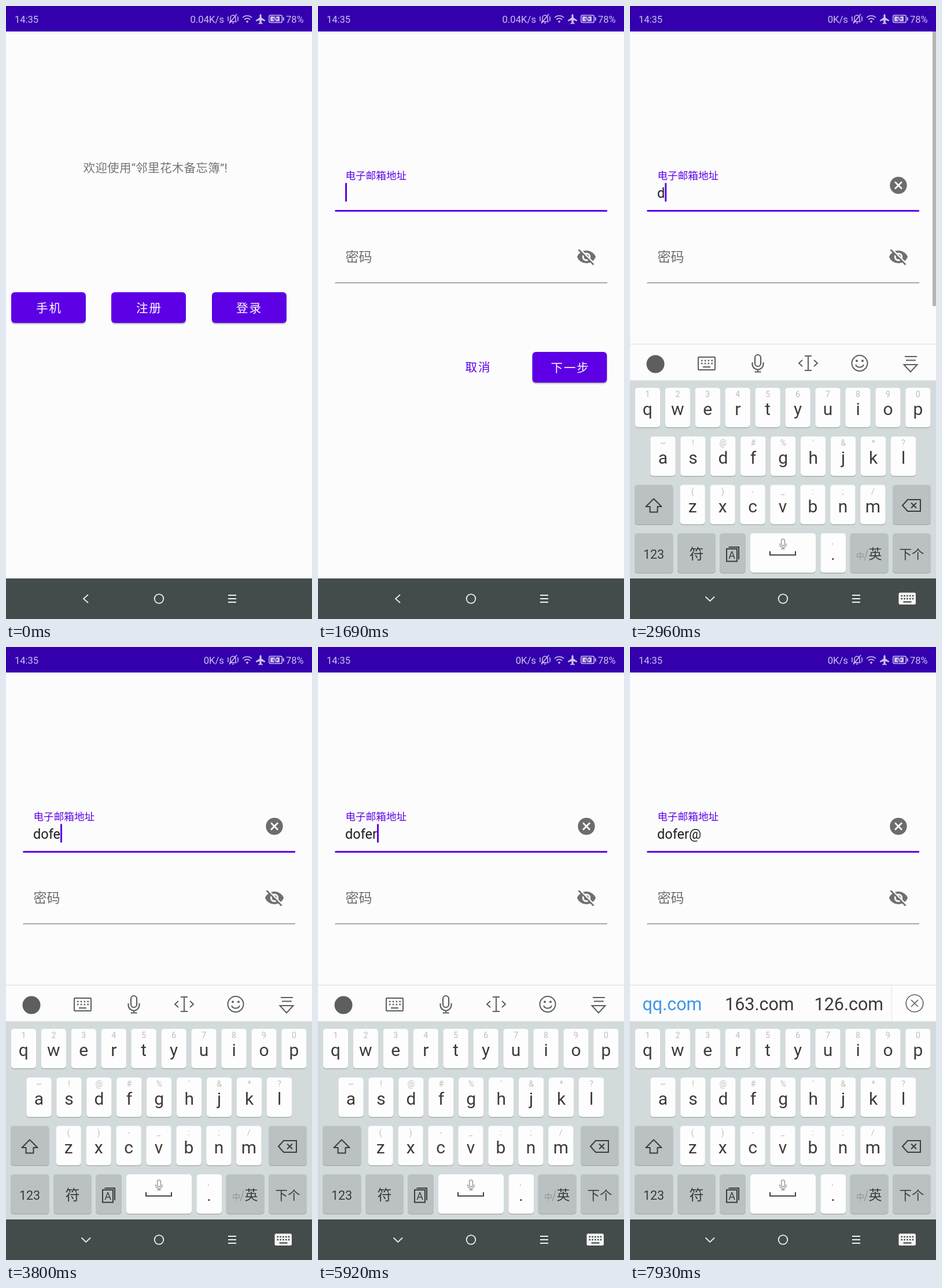
Recreate the animation shown at these times as an HTML page. Size 529 by 1058 pixels, loop 8000 ms.

```html
<!DOCTYPE html>
<html lang="zh-CN">
<head>
<meta charset="utf-8">
<style>
html, body { margin: 0; width: 100%; height: 100%; overflow: hidden; background: #fcfcfd; }
svg { display: block; width: 529px; height: 1058px; font-family: Roboto, "Noto Sans CJK SC", sans-serif; }
text { white-space: pre; }
</style>
</head>
<body>
<svg id="stage" viewBox="0 0 529 1058"></svg>
<script>
const PURPLE = '#5d00e6', INK = '#3b3b3b', ICON = '#5c5f5e', NAV = '#444b4b';
const LOOP = 8000, NAME = 'dofer@';
// time at which each character appears
const TYPED = [2850, 3170, 3490, 3700, 3910, 7180];
const FOCUS = 1480;

const rect = (x, y, w, h, fill, r = 0, more = '') =>
  `<rect x="${x}" y="${y}" width="${w}" height="${h}" rx="${r}" fill="${fill}" ${more}/>`;
const text = (x, y, size, fill, str, more = '') =>
  `<text x="${x}" y="${y}" font-size="${size}" fill="${fill}" ${more}>${str}</text>`;
const mid = (x, y, size, fill, str) => text(x, y, size, fill, str, 'text-anchor="middle"');
const line = (d, color, w = 2, more = '') =>
  `<path d="${d}" fill="none" stroke="${color}" stroke-width="${w}" ${more}/>`;
const disc = (x, y, r, fill, more = '') => `<circle cx="${x}" cy="${y}" r="${r}" fill="${fill}" ${more}/>`;
const ring = (x, y, r, color, w = 2) => disc(x, y, r, 'none', `stroke="${color}" stroke-width="${w}"`);
const group = (id, body, more = '') => `<g id="${id}" ${more}>${body}</g>`;

const button = (x, y, tx, label) =>
  rect(x, y + 3, 129, 53, '#000', 6, 'opacity=".1"') +
  rect(x, y + 1.5, 129, 53, '#000', 6, 'opacity=".18"') +
  rect(x, y, 129, 53, PURPLE, 6) +
  text(tx, y + 34.5, 20.57, '#fff', label, 'letter-spacing="1.84"');

function status() {
  const c = '#cdc3ec';
  return rect(0, 0, 529, 44, '#3400ae') +
    text(15, 29, 16.5, c, '14:35') +
    text(377, 29, 16.7, c, '', 'id="speed" text-anchor="end"') +
    // muted bell
    line('M386 27h13M388 26v-5a4.5 5 0 0 1 9 0v5M391 29.500h3M386 30L399 14M384 18v8M401 18v8', c, 1.5) +
    // wifi
    line('M409 20a11.500 11.500 0 0 1 16 0M412 23.500a7 7 0 0 1 10 0', c, 1.6) + disc(417, 27, 1.8, c) +
    // plane
    `<path fill="${c}" d="M440 14q1.600 0 1.600 3v3l6.400 4.500v2l-6.400-2v4l2 1.500v1.500l-3.600-1l-3.600 1v-1.500l2-1.500v-4l-6.400 2v-2l6.400-4.500v-3q0-3 1.600-3z"/>` +
    // charging battery
    rect(454.8, 16, 22.5, 12.5, 'none', 2.5, `stroke="${c}" stroke-width="1.5"`) +
    rect(457, 18, 16, 8.5, c) + rect(478.800, 19.500, 2, 5.500, c) +
    `<path d="M467 16.500l-6 6.500h4l-2 5l7-6.500h-4z" fill="${c}" stroke="#3400ae"/>` +
    text(484, 29, 16.5, c, '78%');
}

const welcome = () => rect(0, 44, 529, 944, '#fcfcfd') +
  text(133.5, 287, 20.57, '#757575', '欢迎使用“邻里花木备忘簿”!', 'letter-spacing=".25"') +
  button(9, 494, 52, '手机') + button(182, 494, 225, '注册') + button(356, 494, 398, '登录') +
  `<clipPath id="pad"><rect x="182" y="494" width="129" height="53" rx="6"/></clipPath>` +
  disc(246, 520, 0, '#fff', 'id="ripple" clip-path="url(#pad)"');

const eye = () => `<g transform="translate(464 433)">
  <path d="M-16.200 0A17.400 17.400 0 0 1 16.200 0A17.400 17.400 0 0 1-16.200 0" fill="#707070"/>` +
  ring(0, 0, 5.8, '#fcfcfd', 2.9) +
  line('M-12-14L14 12', '#fcfcfd', 2.8) + line('M-13.500-12.500L12.500 13.500', '#707070', 2.7) + '</g>';

const form = () => rect(0, 44, 529, 944, '#fcfcfd') +
  text(47.5, 298.5, 17.6, PURPLE, '电子邮箱地址') +
  text(47, 331, 23.5, '#1c1c1c', '', 'id="entry"') +
  rect(47, 305.5, 3, 32, PURPLE, 0, 'id="caret"') +
  rect(29.5, 352, 470.5, 3, PURPLE) +
  text(47.5, 441, 23, '#6b6b6b', '密码') + eye() +
  rect(29.5, 477, 470.5, 1.4, '#868686') +
  group('clear', disc(464, 309.5, 14.7, '#6c6c6a') + line('M458 303.500l12 12m0-12l-12 12', '#fff', 2.8)) +
  text(254.5, 631, 20.57, PURPLE, '取消', 'letter-spacing="1.84"') +
  button(370.5, 597, 402.5, '下一步') +
  rect(523, 44, 6, 474, '#b5b5b3', 0, 'id="scroll"');

const key = (x, y, w, fill = '#fcfdfc') => rect(x, y + 1.5, w, 68, '#a9afb1', 5) + rect(x, y, w, 68, fill, 5);

const row = (x, y, letters, hints) => [...letters].map((ch, i) => {
  const kx = x + 51.95 * i, cx = kx + 21.7;
  return key(kx, y, 43.3) + mid(cx, y + 16, 14, '#bcbcbc', hints[i]) + mid(cx, y + 47, 30, INK, ch);
}).join('');

const mic = (x, y, s, color) => `<g transform="translate(${x} ${y}) scale(${s})">` +
  rect(-5, -14, 10, 20, 'none', 5, `stroke="${color}" stroke-width="2.2"`) +
  line('M-9.500-1v3a9.500 9.500 0 0 0 19 0v-3M0 11.500v4M-5.500 15.500h11', color, 2.2) + '</g>';

const tools = () =>
  disc(44, 618, 15.5, ICON) +
  rect(118, 606, 29, 22, 'none', 1, `stroke="${ICON}" stroke-width="2"`) +
  line('M123 612h20M123 617h20', ICON, 2.5, 'stroke-dasharray="2.5 3.300"') + line('M126 623h13', ICON) +
  mic(221, 616, 1, ICON) +
  line('M302 604h12M302 629h12M308 604v25M298 611l-6 5.500l6 5.500M318 611l6 5.500l-6 5.500', ICON) +
  ring(397, 616.5, 13.5, ICON) + disc(392, 612.5, 2, ICON) + disc(402, 612.5, 2, ICON) +
  line('M390 619a7.500 7 0 0 0 14 0', ICON) +
  line('M475 605h21M477 611.500h17M473.500 619h23L485 631.500z', ICON);

const domains = () => rect(0, 584, 529, 62, '#fcfcfc') +
  text(21.5, 627, 30.5, '#3d95e6', 'qq.com') + text(164, 627, 30.5, INK, '163.com') +
  text(318.5, 627, 30.5, INK, '126.com') +
  rect(451, 584, 3, 62, '#f3f4f3') + rect(454, 584, 75, 62, '#fdfdfd') +
  ring(492, 615, 14.8, ICON, 1.6) + line('M486 609l12 12m0-12l-12 12', ICON, 1.6);

function keyboard() {
  const dim = '#bbc1c3';
  return rect(0, 583, 529, 63, '#fcfcfc') + rect(0, 583, 529, 1, '#d8dad9') +
    group('tools', tools()) + group('domains', domains()) +
    rect(0, 646, 529, 342, '#d3dadb') +
    row(8.7, 659, 'qwertyuiop', '1234567890') +
    row(35.3, 743, 'asdfghjkl', "~!@#%'&*?".replace('&', '&').split('').map(c => c === '&' ? '&amp;' : c)) +
    row(86.5, 826.5, 'zxcvbnm', '()-_:;/') +
    [[8, 66.5], [454, 66]].map(([x, w]) => key(x, 826.5, w, dim)).join('') +
    line('M41 850.500L27.500 864h7v9.500h13V864h7z', INK, 2, 'stroke-linejoin="round"') +
    line('M471 862l9-10h22v20h-22zM486 857.500l9 9m0-9l-9 9', INK) +
    [[8, 66.5], [82, 66], [155, 45], [380.5, 66], [454, 66]].map(([x, w]) => key(x, 910, w, dim)).join('') +
    key(208, 910, 113) + key(329.500, 910, 43.5) +
    mid(41, 954, 21.5, INK, '123') + mid(115, 954.5, 25, INK, '符') +
    line('M167 937h18v21.500h-18zM170.500 934h17.500v21', INK, 2) + mid(176, 954, 18, INK, 'A') +
    mic(264.5, 928, .58, '#8b8e8d') + line('M242 941v6.500h44v-6.500', INK) +
    mid(350, 929, 14, '#bcbcbc', ',') + mid(351, 956, 28, INK, '.') +
    mid(398, 954, 14, '#8d9293', '中') + line('M405 957l6-19', '#8d9293', 1.2) + mid(424, 954, 23, INK, '英') +
    mid(487, 953.5, 21.5, INK, '下个');
}

const nav = () => rect(0, 988, 529, 70, NAV) +
  ring(264.5, 1023, 7.8, '#eee', 1.8) + line('M384 1017h14M384 1023h14M384 1029h14', '#eee', 1.8) +
  group('back', line('M142 1016l-8 7l8 7', '#eee', 1.8)) +
  group('down', line('M130.500 1019.500l7.800 7.500l7.800-7.500', '#eee', 1.8) +
    rect(464.5, 1012.5, 29.500, 20.500, '#f5f5f5', 2.5) +
    line('M468.500 1018h22M468.500 1023h22', NAV, 2.6, 'stroke-dasharray="2.600 2.200"') +
    line('M472.500 1028.500h14', NAV, 2.2));

document.getElementById('stage').innerHTML =
  group('welcome', welcome()) + group('form', form()) + group('keys', keyboard()) + nav() + status();

const el = id => document.getElementById(id);
const set = (id, name, value) => el(id).setAttribute(name, value);
const show = (id, on) => set(id, 'opacity', +on);
const ramp = (t, from, to) => Math.min(1, Math.max(0, (t - from) / (to - from)));
const easeOut = p => 1 - (1 - p) ** 3;

function draw(t) {
  const press = ramp(t, 1160, 1370);
  set('ripple', 'r', 75 * easeOut(press));
  set('ripple', 'opacity', press ? .24 : 0);

  const enter = easeOut(ramp(t, 1370, 1580));
  show('form', enter);
  set('form', 'transform', `translate(0 ${40 * (1 - enter)})`);

  const rise = easeOut(ramp(t, 1800, 2010));
  set('keys', 'transform', `translate(0 ${405 * (1 - rise)})`);
  show('keys', rise > 0);
  show('back', t < 1900);
  show('down', t >= 1900);
  show('scroll', t < 2010 ? 0 : 1 - ramp(t, 3200, 3450));

  const count = TYPED.filter(at => t >= at).length;
  const since = t - (count ? TYPED[count - 1] : FOCUS);
  el('entry').textContent = NAME.slice(0, count);
  set('caret', 'x', 47 + (count ? el('entry').getComputedTextLength() : 0));
  show('caret', Math.floor((since + 80) / 500) % 2 === 0);
  show('clear', count > 0);
  el('speed').textContent = t < 2850 ? '0.04K/s' : '0K/s';

  show('tools', t < 7250);
  show('domains', t >= 7250);
}

function tick() {
  draw(performance.now() % LOOP);
  requestAnimationFrame(tick);
}
tick();
</script>
</body>
</html>
```
